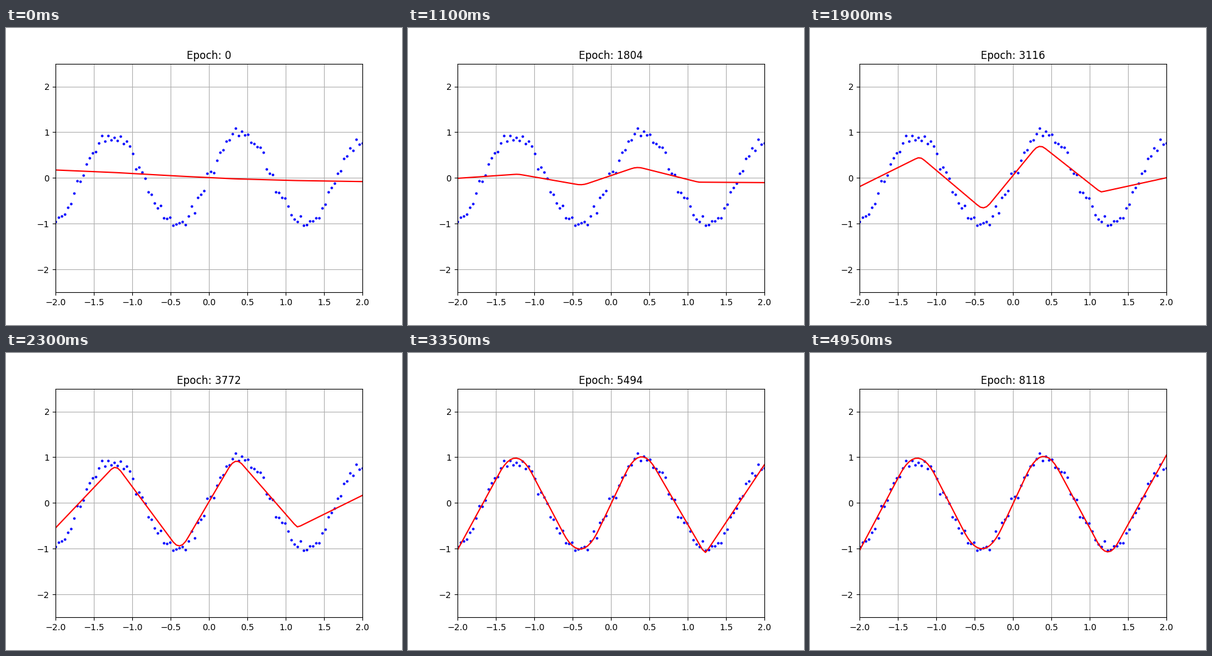
Animation of 640 by 480 pixels, one loop 5 s. Source, as a matplotlib script:

```python
import numpy as np
import matplotlib.pyplot as plt
from matplotlib.animation import FuncAnimation

FRAMES = 100
EPOCHS_PER_FRAME = 82

rng = np.random.default_rng(7)
x = np.linspace(-2, 2, 100)
samples = np.sin(1.2 * np.pi * x) + rng.normal(0, .09, x.size)

# The fit is a zigzag with six corners. Each height starts on a gentle
# slope, falls back to its rest and then grows to its goal.
START = np.array([.175, .095, .05, -.047, -.02, .04])
REST = np.array([0, .02, 0, 0, -.03, -.12])
GOAL = np.array([-1.04, 1.35, -1.43, 1.37, -1.28, 1.05])
GROW_MID = np.array([45.5, 42.7, 38, 36.2, 49.6, 55])
GROW_TIME = np.array([5, 6.9, 7.75, 9.35, 9.3, 8])
FADE_TIME = 5

# Corners shift and become rounder once the zigzag has grown
EARLY_X = np.array([-2, -1.21, -.375, .34, 1.14, 2])
LATE_X = np.array([-2, -1.243, -.391, .385, 1.235, 2])
EARLY_ROUND = np.array([.04, .07, .07, .02])
LATE_ROUND = np.array([.23, .25, .21, .14])
ROUND_MID = np.array([56, 56, 56, 85])
SETTLE_MID, SETTLE_TIME = 56, 5


def sigmoid(frame, mid, time):
    return 1 / (1 + np.exp((mid - frame) / time))


def mix(a, b, t):
    return a + (b - a) * t


def soft_ramp(d, w):
    """Ramp max(d, 0) with its bend rounded over -w..w."""
    return np.clip(d + w, 0, 2 * w) ** 2 / (4 * w) + np.maximum(d - w, 0)


def fit_at(frame):
    heights = mix(REST, GOAL, sigmoid(frame, GROW_MID, GROW_TIME))
    heights = heights + START * np.exp(-frame / FADE_TIME)
    corners = mix(EARLY_X, LATE_X, sigmoid(frame, SETTLE_MID, SETTLE_TIME))
    rounding = mix(EARLY_ROUND, LATE_ROUND,
                   sigmoid(frame, ROUND_MID, SETTLE_TIME))
    slopes = np.diff(heights) / np.diff(corners)
    y = heights[0] + slopes[0] * (x - corners[0])
    for corner, bend, w in zip(corners[1:-1], np.diff(slopes), rounding):
        y = y + bend * soft_ramp(x - corner, w)
    return y


fig, ax = plt.subplots(figsize=(6.4, 4.8), dpi=100)
ax.set_xlim(-2, 2)
ax.set_ylim(-2.5, 2.5)
ax.grid(True)
ax.plot(x, samples, "b.", markersize=4)
line, = ax.plot(x, fit_at(0), "r-")
title = ax.set_title("Epoch: 0", pad=5.4)


def update(frame):
    line.set_ydata(fit_at(frame))
    title.set_text(f"Epoch: {frame * EPOCHS_PER_FRAME}")
    return line, title


anim = FuncAnimation(fig, update, frames=FRAMES, interval=50,
                     repeat=True, repeat_delay=0)
plt.show()
```
